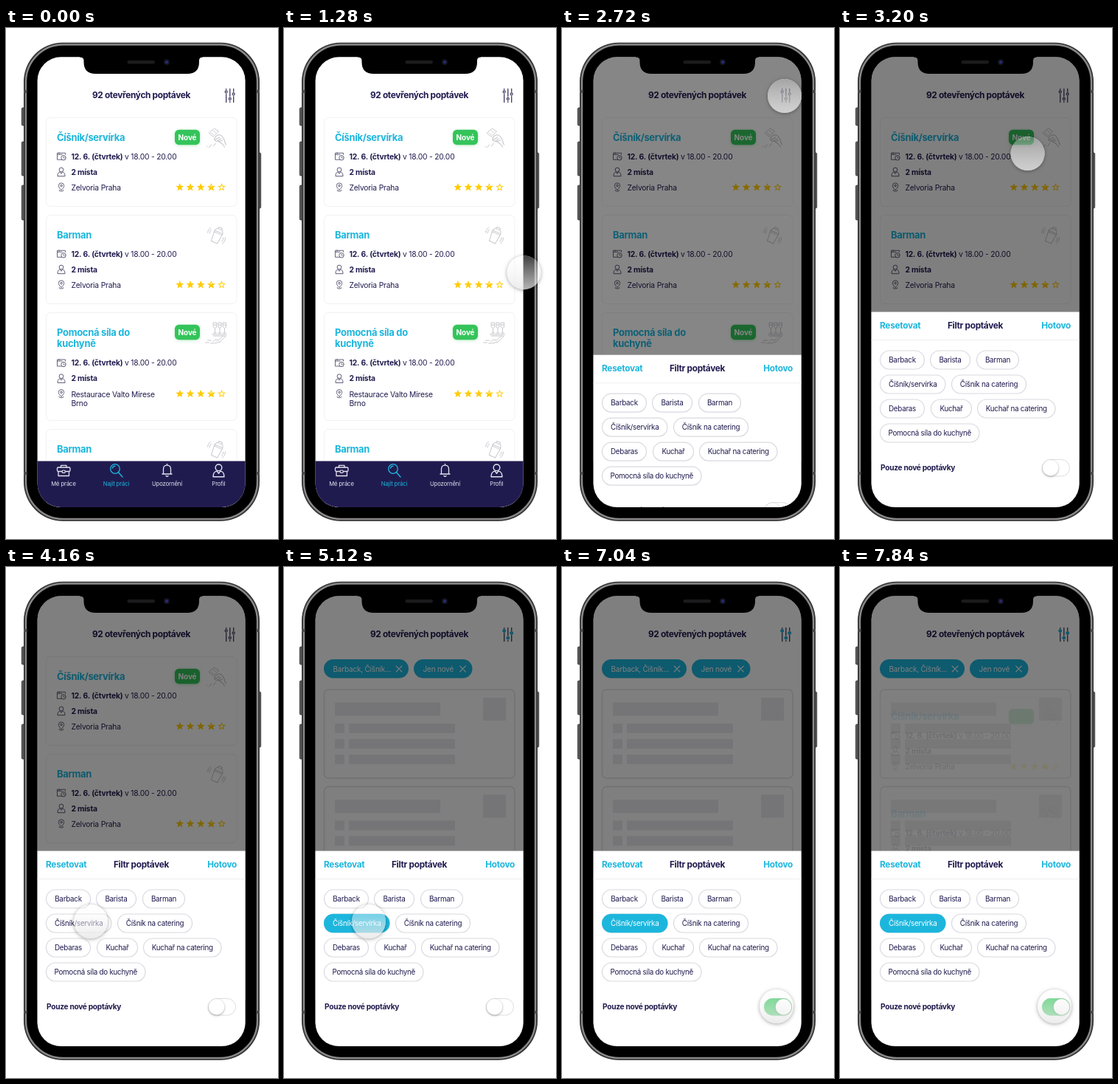
Write an HTML page with a canvas that moves like this. It is 369 px wide and 692 px high and loops after 8 s.

```html
<!DOCTYPE html>
<html lang="cs">
<head>
<meta charset="utf-8">
<title>Filtr poptávek</title>
<style>
html, body { margin: 0; width: 100%; height: 100%; overflow: hidden; background: #fff; }
canvas { display: block; width: 369px; height: 692px; }
</style>
</head>
<body>
<canvas id="stage"></canvas>
<script>
const W = 369, H = 692, LOOP = 8000, STEP = 160;
const NAVY = '#201b4f', CYAN = '#1cb6dd', GREEN = '#34c45a', GOLD = '#ffcb05', GREY = '#c9c9cf', SLATE = '#55536f';
const canvas = document.getElementById('stage');
const dpr = window.devicePixelRatio || 1;
canvas.width = W * dpr;
canvas.height = H * dpr;
const c = canvas.getContext('2d');

// Timing helpers
const span = (t, a, b) => Math.min(1, Math.max(0, (t - a) / (b - a)));
const inOut = u => u < .5 ? 2 * u * u : 1 - 2 * (1 - u) * (1 - u);
const outCubic = u => 1 - (1 - u) ** 3;
const mix = (a, b, u) => a + (b - a) * u;
const cubic = (p, u) => {
  const v = 1 - u;
  return [0, 1].map(i => v * v * v * p[0][i] + 3 * v * v * u * p[1][i] + 3 * v * u * u * p[2][i] + u * u * u * p[3][i]);
};

// Drawing helpers
function box(x, y, w, h, r, fill, stroke, lw = 1) {
  c.beginPath();
  c.roundRect(x, y, w, h, r);
  if (fill) { c.fillStyle = fill; c.fill(); }
  if (stroke) { c.strokeStyle = stroke; c.lineWidth = lw; c.stroke(); }
}
function disc(x, y, r, fill, stroke, lw = 1) {
  c.beginPath();
  c.arc(x, y, r, 0, 7);
  if (fill) { c.fillStyle = fill; c.fill(); }
  if (stroke) { c.strokeStyle = stroke; c.lineWidth = lw; c.stroke(); }
}
function line(d, color, lw = 1) {
  c.strokeStyle = color;
  c.lineWidth = lw;
  c.lineCap = c.lineJoin = 'round';
  c.stroke(new Path2D(d));
}
function text(s, x, y, size, weight, color, align = 'left', gap = -.2) {
  c.font = `${weight} ${size}px Inter, Roboto, sans-serif`;
  c.letterSpacing = gap + 'px';
  c.textAlign = align;
  c.fillStyle = color;
  c.fillText(s, x, y + size * .364);
}
function group(x, y, alpha, draw, turn = 0) {
  c.save();
  c.translate(x, y);
  c.rotate(turn);
  c.globalAlpha *= alpha;
  draw();
  c.restore();
}
function shadow(color, blur, draw) {
  c.save();
  c.shadowColor = color;
  c.shadowBlur = blur * dpr;
  c.shadowOffsetY = dpr;
  draw();
  c.restore();
}

// Row icons
function calendar(x, y) {
  group(x, y, 1, () => {
    line('M5 4.5H-5.5V-4.5H5.5V-2.5M-5.5 -2.5H1M-3 -5V-3.5', SLATE, .9);
    disc(3, 2, 3.2, '#fff', SLATE, .9);
    line('M3 .5V2.2H4.2', SLATE, .8);
  });
}
function person(x, y, color, k = 1) {
  group(x, y, 1, () => {
    c.scale(k, k);
    disc(0, -2.8, 2.9, null, color, .95);
    line('M-5 5.5C-5 1 -3 .6 -1.5 .4L0 2.5L1.5 .4C3 .6 5 1 5 5.5Z', color, .95);
  });
}
function pin(x, y) {
  group(x, y, 1, () => {
    line('M0 3.5C-3 .5 -3.7 -.6 -3.7 -2.2A3.7 3.7 0 0 1 3.7 -2.2C3.7 -.6 3 .5 0 3.5M-2.5 3.4C-6 5.8 6 5.8 2.5 3.4', SLATE, .9);
    disc(0, -2.2, 1.3, null, SLATE, .9);
  });
}

// Job icons
const icons = {
  waiter() {
    line('M-10 -7L-3 -13L3 -9L-4 -2ZM-7 -7L-4 -4M-4 -10L-1 -7', GREY, 1);
    line('M-2 -1C2 -6 7 -5 9 0C12 3 10 4 13 9M-2 -1C-4 3 -1 5 2 4L8 8L11 12M-1 2L4 -1M1 4L6 1M3 5L8 3', GREY, 1.2);
    line('M-1 7L-4 11M-7 9L-10 13M-12 11L-13 12', GREY, 1);
  },
  shaker() {
    group(1, 0, 1, () => {
      line('M-6 -5L-4.5 10H4.5L6 -5ZM-6 -5L-4 -9H4L6 -5M-2.5 -9V-11.5H2.5V-9M-5.8 -3H5.8', GREY, 1);
    }, .42);
    line('M-12 -4Q-12 -8 -8 -11M-9.5 -3Q-9.5 -6 -7 -8M12 3Q12 8 8 11M9.5 3Q9.5 6 7.5 8', GREY, 1);
  },
  tray() {
    for (const x of [-2, 4.5, 11]) line(`M${x - 2} -14H${x + 2}V-8Q${x} -5 ${x - 2} -8ZM${x - 2} -11H${x + 2}M${x} -6V0M${x - 2} 0H${x + 2}`, GREY, 1);
    line('M-6 2H14M-4 4H12M13 4L5 12M9 4L3 10L-2 9L-5 12M5 12L-3 14H-8M-10 13H-15M-12 10H-7', GREY, 1);
  }
};

function starPath() {
  c.beginPath();
  for (let i = 0; i < 10; i++) {
    const a = i * Math.PI / 5 - Math.PI / 2, r = i % 2 ? 2.5 : 5.7;
    c.lineTo(r * Math.cos(a), r * Math.sin(a));
  }
  c.closePath();
}
function stars(y) {
  for (let i = 0; i < 5; i++) group(235.8 + i * 14.2, y, 1, () => {
    starPath();
    c.fillStyle = c.strokeStyle = GOLD;
    if (i < 3) return c.fill();
    c.clip();
    if (i === 3) c.fillRect(-6, -1, 12, 7);
    c.lineWidth = 1.8;
    c.stroke();
  });
}

function job(y, h, title, icon, fresh, place) {
  box(54.5, y, 258.5, h, 6, '#fff', '#f1f1f4');
  title.forEach((s, i) => text(s, 69, y + 26.5 + i * 15.7, 13, 700, CYAN, 'left', -.32));
  group(285.5, y + 27.5, 1, icons[icon]);
  if (fresh) {
    shadow('rgba(52,196,90,.3)', 4, () => box(229, y + 16.3, 34, 20.4, 5.5, GREEN));
    text('Nové', 246, y + 26.5, 10, 700, '#fff', 'center', -.1);
  }
  const top = y + 52.3 + (title.length - 1) * 15.7;
  calendar(75, top);
  text('12. 6. (čtvrtek)', 88.5, top, 10.3, 700, NAVY);
  text('v 18.00 - 20.00', 161, top, 10.3, 400, NAVY);
  person(75, top + 21, SLATE);
  text('2 místa', 88.5, top + 21.2, 10.3, 700, NAVY);
  pin(75, top + 42);
  place.forEach((s, i) => text(s, 88.5, top + 42.3 + i * 12, 10.3, 400, NAVY));
  stars(top + 42);
}
function jobs(dy = 0) {
  const hall = ['Zelvoria Praha'];
  job(121.5 + dy, 120, ['Číšník/servírka'], 'waiter', true, hall);
  job(253.5 + dy, 120, ['Barman'], 'shaker', false, hall);
  job(385.5 + dy, 146, ['Pomocná síla do', 'kuchyně'], 'tray', true, ['Restaurace Valto Mirese', 'Brno']);
  job(543.5 + dy, 120, ['Barman'], 'shaker', false, hall);
}

function tag(x, w, s) {
  box(x, 125, w, 25.5, 12.75, CYAN);
  text(s, x + 12.5, 138, 10, 400, '#fff');
  const r = x + w - 13;
  line(`M${r - 3.8} 134.2l7.6 7.6m0 -7.6l-7.6 7.6`, '#fff', 1.2);
}
function skeleton() {
  for (const y of [166, 297.5, 429]) {
    box(54.5, y, 258.5, 120, 6, '#fff', '#e4e4e9', 1.4);
    const bar = (x, dy, w, h) => box(x, y + dy, w, h, 0, '#ebebef');
    bar(69, 17.5, 143, 18);
    bar(270, 11, 31, 31);
    for (const dy of [46, 67, 88]) { bar(69, dy, 13, 13); bar(88, dy, 144, 13); }
  }
}

function sliders(on) {
  [[298.7, 86.5], [303.8, 96], [308.7, 89.5]].forEach(([x, y]) => {
    line(`M${x} 82.5V${y - 3.2}M${x} ${y + 3.2}V100.5`, '#49466b', 1.4);
    disc(x, y, 1.5, null, '#49466b', 1.3);
    if (on) group(0, 0, on, () => disc(x, y, 2.3, CYAN));
  });
}

function nav() {
  c.fillStyle = NAVY;
  c.fillRect(42, 586.5, 283, 64);
  const ink = '#e3e2ee';
  [[78, 'Mé práce'], [149.5, 'Najít práci'], [218.5, 'Upozornění'], [288.5, 'Profil']].forEach(([x, s], i) =>
    text(s, x, 617, 7.7, 400, i === 1 ? CYAN : ink, 'center', -.1));
  box(69.5, 595, 17.5, 5.5, 1.5, null, ink, 1.3);
  line('M74.5 595V592.3H82V595M71 600.5V606.5H85.5V600.5', ink, 1.3);
  box(76.2, 599, 4, 3.4, 1, NAVY, ink, 1.1);
  disc(148, 597, 6.3, null, CYAN, 1.3);
  line('M152.5 601.7L158 608M144.5 596Q145 593.5 148 593.3', CYAN, 1.4);
  line('M212 604H225M213.5 604V597C213.5 590.5 223.5 590.5 223.5 597V604M217 606.5Q218.5 608 220 606.5M218.5 592V590.5', ink, 1.3);
  person(288.5, 599.5, ink, 1.5);
}

function chip(x, w, row, s, on = 0) {
  const y = 52.5 + row * 33;
  box(x + .5, y, w - 1, 25, 12.5, '#fff', '#d9d9e0', 1.2);
  text(s, x + w / 2, y + 12.7, 9.8, 400, NAVY, 'center', -.25);
  if (on) group(0, 0, on, () => {
    box(x, y - .2, w, 25.4, 12.7, CYAN);
    text(s, x + w / 2, y + 12.7, 9.8, 400, '#fff', 'center', -.25);
  });
}
function sheet(y, picked, toggled) {
  group(0, y, 1, () => {
    c.fillStyle = '#fff';
    c.fillRect(42, 0, 283, 300);
    text('Resetovat', 54, 18.5, 11.8, 700, CYAN, 'left', -.25);
    text('Filtr poptávek', 183.5, 18.5, 11.8, 700, NAVY, 'center', -.3);
    text('Hotovo', 313, 18.5, 11.8, 700, CYAN, 'right', -.25);
    c.fillStyle = '#f0f0f3';
    c.fillRect(42, 37.5, 283, 1);
    chip(54, 61, 0, 'Barback');
    chip(122, 55, 0, 'Barista');
    chip(185, 58, 0, 'Barman');
    chip(54, 89.5, 1, 'Číšník/servírka', picked);
    chip(151, 102, 1, 'Číšník na catering');
    chip(54, 61, 2, 'Debaras');
    chip(123, 56, 2, 'Kuchař');
    chip(186, 106.5, 2, 'Kuchař na catering');
    chip(54, 135.5, 3, 'Pomocná síla do kuchyně');
    text('Pouze nové poptávky', 55, 210.3, 10.2, 700, NAVY, 'left', -.3);
    box(274.5, 200, 37, 22.5, 11.25, '#fff', '#dedee3');
    group(0, 0, toggled, () => box(274, 199.5, 38, 23.5, 11.75, GREEN));
    shadow('rgba(0,0,0,.35)', 3, () => disc(mix(285.5, 300.5, toggled), 211.3, 10.7, '#fff'));
  });
}

function body() {
  for (const [y, h] of [[108, 24], [154, 46], [213, 47]]) box(21.3, y, 5, h, 1.5, '#5a5859', '#2b2a2b', .8);
  box(341, 169, 4.7, 75, 1.5, '#5a5859', '#2b2a2b', .8);
  // Dark rim, bright band, black bezel
  box(24, 19.7, 320, 648, 53, '#343334');
  box(27, 22.5, 314, 642.4, 50.5, '#000', '#8b8988', 2.4);
  c.fillStyle = '#4d4c4c';
  for (const x of [24, 339.5]) for (const y of [84, 601]) c.fillRect(x, y, 4.5, 4);
  box(29.5, 25, 309, 637.4, 48, '#000');
}
function notch() {
  c.fillStyle = '#000';
  c.fill(new Path2D('M100 38H267V39.5Q262 39.5 262 44V46Q262 62 246 62H121.5Q105.500 62 105.5 46V44Q105.5 39.5 100 39.5Z'));
  box(164.5, 44, 37.5, 4.5, 2.25, '#1b1b1d');
  disc(218, 46.3, 4, '#14141f');
  disc(218, 46.3, 2, '#2d2a78');
}

// Glass pointer: clear at the top, frosted at the bottom
function pointer(x, y) {
  const r = 23;
  c.save();
  c.beginPath();
  c.rect(0, 0, W, H);
  c.arc(x, y, r, 0, 7);
  c.clip('evenodd');
  shadow('rgba(0,0,0,.36)', 5, () => disc(x, y, r, '#fff'));
  c.restore();
  const g = c.createLinearGradient(x, y - r, x, y + r);
  g.addColorStop(0, 'rgba(255,255,255,.25)');
  g.addColorStop(1, 'rgba(230,230,230,.78)');
  disc(x, y, r, g);
}

const enter = [[385, 712], [377, 425], [262, 190], [302, 92]];
const toChip = [[302, 92], [231, 201], [168, 331], [115, 480]];
const toToggle = [[115, 480], [170, 530], [235, 575], [284, 594]];
function pointerAt(t) {
  if (t < 2560) return cubic(enter, inOut(span(t, 160, 2400)));
  if (t < 5680) return cubic(toChip, inOut(span(t, 2720, 4140)));
  const [x, y] = cubic(toToggle, inOut(span(t, 5680, 6380)));
  const drag = inOut(span(t, 6480, 7000));
  return [x + 7 * drag, y + drag];
}

function draw(t) {
  c.setTransform(dpr, 0, 0, dpr, 0, 0);
  c.fillStyle = '#fff';
  c.fillRect(0, 0, W, H);
  body();

  const filtered = inOut(span(t, 4560, 5040));
  const loaded = span(t, 7600, 8400);
  const rise = span(t, 2480, 3085);

  c.save();
  c.beginPath();
  c.roundRect(42.6, 39.3, 282, 609.7, 32);
  c.clip();
  c.fillStyle = '#fff';
  c.fillRect(42, 39, 283, 611);
  if (filtered < 1) group(0, 0, 1 - filtered, () => jobs());
  if (filtered > 0) group(0, 0, filtered, () => {
    group(0, 0, 1 - loaded * .6, skeleton);
    if (loaded > 0) group(0, 0, loaded * .5, () => jobs(44.5 + 14 * (1 - loaded)));
    tag(54, 115, 'Barback, Číšník...');
    tag(176, 79.5, 'Jen nové');
  });
  text('92 otevřených poptávek', 183.5, 91, 11.9, 700, NAVY, 'center', -.35);
  sliders(filtered);
  nav();
  if (rise > 0) {
    c.fillStyle = `rgba(0,0,0,${.5 * (1 - (1 - rise) ** 6)})`;
    c.fillRect(42, 39, 283, 611);
    sheet(384.5 + 265 * (1 - outCubic(rise)), span(t, 4480, 4800), inOut(span(t, 6480, 7000)));
  }
  c.restore();

  notch();
  if (t > 160) pointer(...pointerAt(t));
}

function tick() {
  const t = performance.now() % LOOP;
  draw(Math.floor(t / STEP) * STEP);
  requestAnimationFrame(tick);
}
tick();
</script>
</body>
</html>
```
